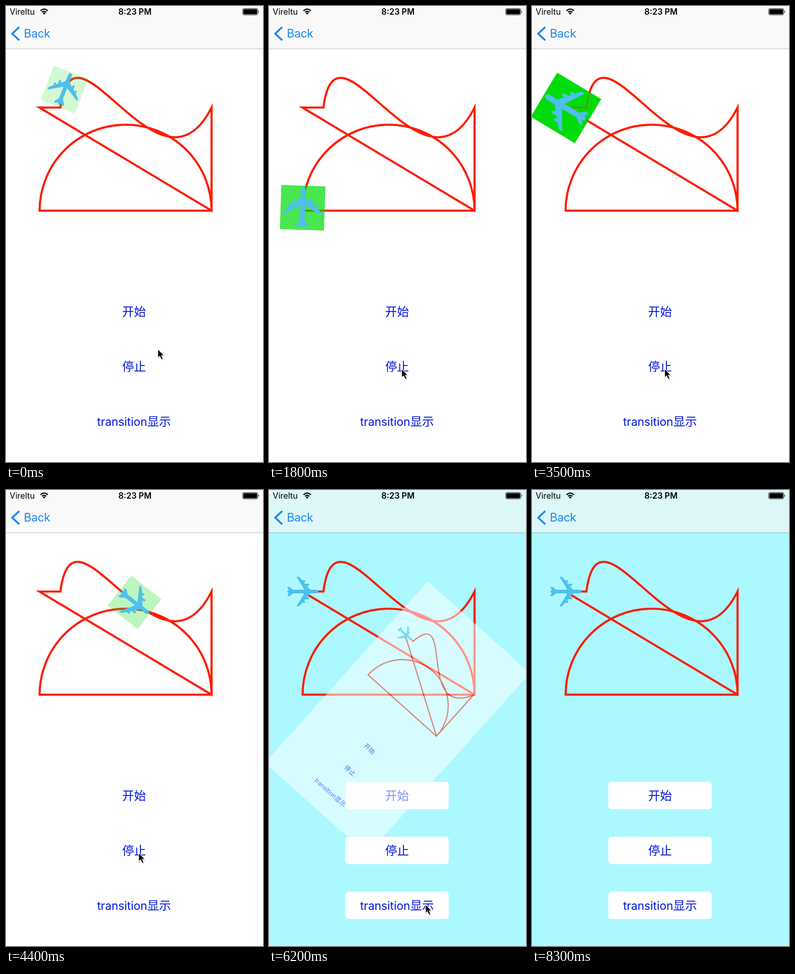
Recreate the animation shown at these times as an HTML page. Size 562 px wide and 997 px high, loop 8400 ms.

```html
<!DOCTYPE html>
<html lang="zh">
<head>
<meta charset="utf-8">
<title>Path animation</title>
<style>
html, body { margin: 0; width: 100%; height: 100%; overflow: hidden; background: #fff; }
svg { display: block; width: 100%; height: 100%; }
text { font-family: Inter, "Noto Sans CJK SC", "Noto Sans CJK", sans-serif; }
.label { font-size: 26px; fill: #0014e1; text-anchor: middle; }
.latin { font-size: 25px; }
.track { fill: none; stroke: #ff1c00; stroke-width: 4.6; stroke-miterlimit: 10; }
</style>
</head>
<body>
<svg viewBox="0 0 562 997" preserveAspectRatio="none">
  <defs>
    <path id="track" class="track" d="M73 222H119C148 -3 336 447 449.500 222V447.500H73.500A188 188 0 0 1 449.500 447.500Z"/>
    <clipPath id="tileClip"><rect id="clipBox" x="-37.500" y="-37.500" width="75" height="75"/></clipPath>
    <g id="wing">
      <path d="M18 -3L-7 -32L-13 -32.500L5 -3Z"/>
      <path d="M-5 -24.500H6V-20.500H-2ZM1 -17H14.500V-12.500H4Z"/>
      <path d="M-19 -3L-28 -10L-33 -10L-29 -1H-19Z"/>
    </g>
  </defs>

  <rect id="back" width="562" height="997"/>

  <g id="scene">
    <use href="#track"/>
    <g id="buttons" fill="#fff">
      <rect x="167" y="638" width="226" height="60" rx="7"/>
      <rect x="167" y="758" width="226" height="60" rx="7"/>
      <rect x="167" y="878" width="226" height="60" rx="7"/>
    </g>
    <text class="label" x="280" y="678">开始</text>
    <text class="label" x="280" y="798">停止</text>
    <text class="label" x="280" y="918"><tspan class="latin">transition</tspan>显示</text>
    <rect id="tile" x="-37.500" y="-37.500" width="75" height="75" fill="#00dc0a"/>
    <g id="through" clip-path="url(#tileClip)"><use href="#track"/></g>
    <g id="plane" fill="#4fbfec">
      <use href="#wing"/>
      <use href="#wing" transform="scale(1 -1)"/>
      <path d="M-33 -1.500L-26 -4H30Q35 -3.500 35 0Q35 3.500 30 4H-26L-33 1.500Z"/>
    </g>
  </g>

  <g id="sheet">
    <rect width="562" height="997" fill="#fff"/>
    <use href="#scene"/>
  </g>

  <rect width="562" height="93" fill="#f7f7f7" fill-opacity=".68"/>
  <rect y="93" width="562" height="1" fill="#000" fill-opacity=".27"/>
  <text x="8" y="19" font-size="18">Vireltu</text>
  <text x="282" y="19" font-size="18" font-weight="600" text-anchor="middle">8:23 PM</text>
  <g fill="none" stroke="#000" stroke-width="2.600">
    <path d="M75.500 10.500Q83.500 3 91.500 10.500M78.800 13.800Q83.500 9.500 88.200 13.800"/>
    <path d="M83.500 19L80.500 15.800Q83.500 13.400 86.500 15.800Z" fill="#000" stroke="none"/>
  </g>
  <rect x="517.500" y="5.500" width="33" height="14" rx="3" fill="none" stroke="#000"/>
  <rect x="519" y="7" width="30" height="11" rx="1.500"/>
  <path d="M552 10Q554.500 12.500 552 15Z"/>
  <path d="M29 46L13.500 60.500L29 75" fill="none" stroke="#1e88f2" stroke-width="4"/>
  <text x="39" y="69" font-size="25.500" letter-spacing="-.5" fill="#1e88f2">Back</text>

  <g id="cursor">
    <path d="M1 3V22L5.500 18L9 25L12.500 23.500L9.500 17H15Z" fill="#000" opacity=".18"/>
    <path d="M0 0V19.500L4.400 15.500L7.700 23L11.400 21.300L8.200 14.200H14Z" stroke="#fff" stroke-width="1.300"/>
  </g>
</svg>

<script>
const LOOP = 8400, STEP = 100, LAP = 4000, STOP = 4800, SWAP = 5720, SWAP_TIME = 1000;
const el = id => document.getElementById(id);
const [back, tile, clipBox, through, plane, sheet, cursor] =
  ['back', 'tile', 'clipBox', 'through', 'plane', 'sheet', 'cursor'].map(el);

const mix = (a, b, k) => a + (b - a) * k;
const clamp = k => Math.max(0, Math.min(1, k));
const bezier = (a, b, c, d, k) => {
  const m = 1 - k;
  return a * m * m * m + 3 * b * m * m * k + 3 * c * m * k * k + d * k * k * k;
};

function easeInOut(x) {
  let lo = 0, hi = 1;
  for (let i = 0; i < 24; i++) {
    const mid = (lo + hi) / 2;
    if (bezier(0, .42, .58, 1, mid) < x) lo = mid; else hi = mid;
  }
  return bezier(0, 0, 1, 1, lo);
}

const line = (x1, y1, x2, y2) => k => [mix(x1, x2, k), mix(y1, y2, k)];
const arc = from => k => {
  const a = (from + 90 * k) * Math.PI / 180;
  return [261.5 + 188 * Math.cos(a), 447.5 + 188 * Math.sin(a)];
};

// every segment takes the same share of a lap
const segments = [
  line(73, 222, 119, 222),
  k => [bezier(119, 148, 336, 449.5, k), bezier(222, -3, 447, 222, k)],
  line(449.5, 222, 449.5, 447.5),
  line(449.5, 447.5, 73.5, 447.5),
  arc(180),
  arc(270),
  line(449.5, 447.5, 73, 222)
];

function pose(lap) {
  const u = lap * segments.length, i = Math.floor(u), k = u - i;
  const [x, y] = segments[i](k);
  const [x1, y1] = segments[i](k - .001), [x2, y2] = segments[i](k + .001);
  return [x, y, Math.atan2(y2 - y1, x2 - x1) * 180 / Math.PI];
}

const lapTime = t => t < 1800 ? mix(614, 2298, t / 1800) : t + 498;

function drawPlane(t) {
  const flying = t < STOP;
  const lap = flying ? lapTime(t) % LAP / LAP : 0;
  const [x, y, angle] = flying ? pose(lap) : [73, 222, 0];
  const place = `translate(${x} ${y}) rotate(${angle}) scale(${1 + lap / 2})`;
  for (const part of [tile, clipBox, plane]) part.setAttribute('transform', place);
  tile.setAttribute('opacity', lap * (1 + lap * (1 - lap)));
  through.setAttribute('opacity', .3 * lap * lap);
}

function drawSheet(t) {
  const p = easeInOut(clamp((t - SWAP) / SWAP_TIME));
  const active = t >= SWAP && p < .999;
  back.setAttribute('fill', t < SWAP ? '#fff' : '#abf9ff');
  sheet.setAttribute('visibility', active ? 'visible' : 'hidden');
  sheet.setAttribute('display', active ? 'inline' : 'none');
  sheet.setAttribute('opacity', 1 - p);
  sheet.setAttribute('transform',
    `translate(281 498.5) rotate(${90 * p}) scale(${1 - p}) translate(-281 -498.5)`);
}

// time, x, y
const moves = [[300, 332, 750], [900, 290, 793], [4900, 290, 793], [5400, 295, 906], [6000, 295, 906], [6200, 342, 906]];

function drawCursor(t) {
  let [, x, y] = moves[0];
  for (let i = 1; i < moves.length; i++) {
    const [t0, x0, y0] = moves[i - 1], [t1, x1, y1] = moves[i];
    if (t < t0) break;
    const k = easeInOut(clamp((t - t0) / (t1 - t0)));
    x = mix(x0, x1, k);
    y = mix(y0, y1, k);
  }
  cursor.setAttribute('transform', `translate(${x} ${y})`);
  cursor.setAttribute('display', t < 6300 ? 'inline' : 'none');
}

const start = performance.now();
function tick() {
  const now = Math.max(0, performance.now() - start) % LOOP;
  const t = Math.floor(now / STEP) * STEP;
  drawPlane(t);
  drawSheet(t);
  drawCursor(t);
  requestAnimationFrame(tick);
}
tick();
</script>
</body>
</html>
```
